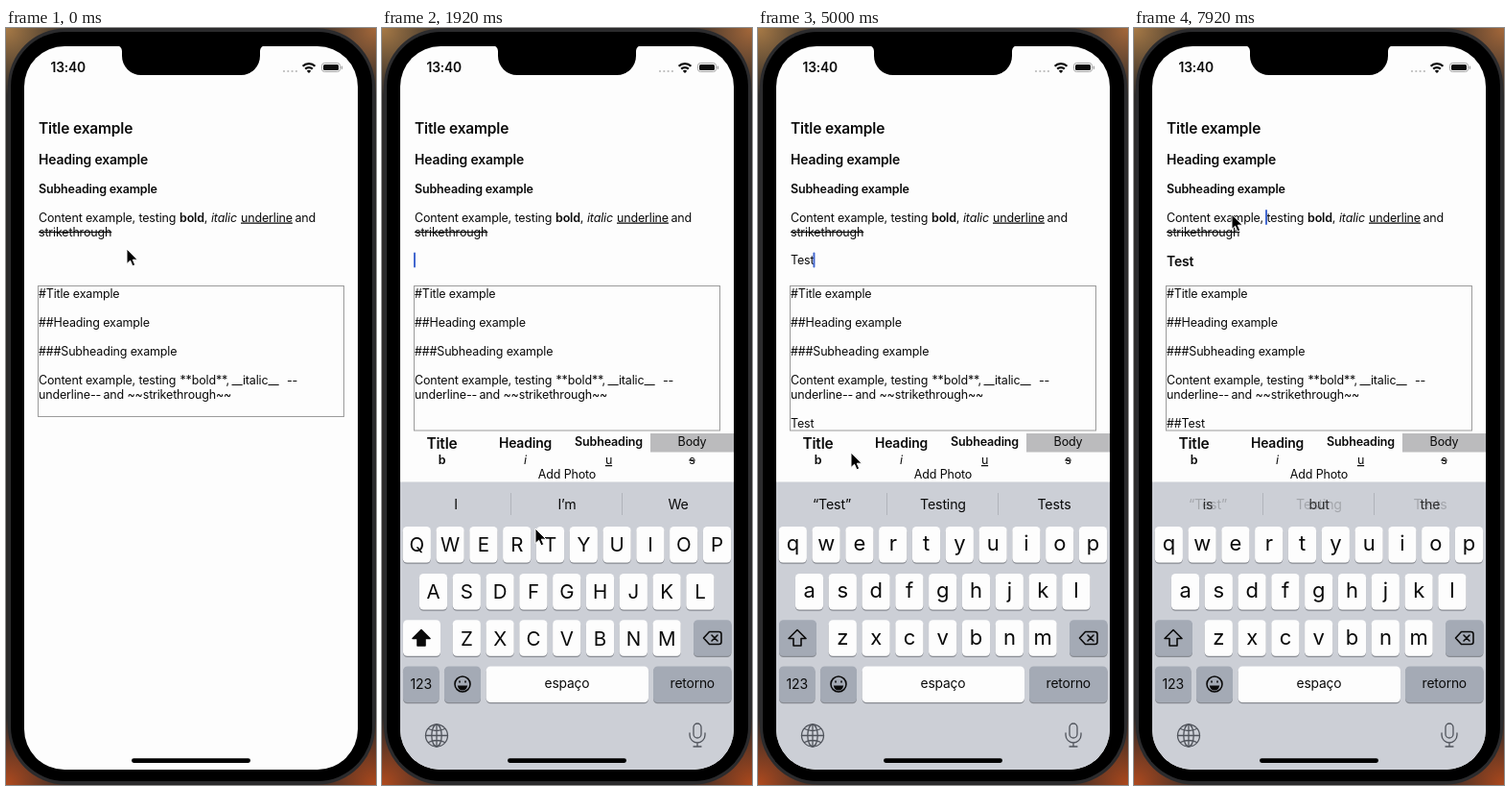
Write an HTML page that moves like this. It is 386 px wide and 788 px high and loops after 8000 ms.

```html
<!DOCTYPE html>
<html lang="en">
<head>
<meta charset="utf-8">
<title>Markdown editor</title>
<style>
  html, body { margin: 0; width: 100%; height: 100%; overflow: hidden; background: #000; }
  svg { display: block; width: 386px; height: 788px; font-family: Inter, sans-serif; letter-spacing: -0.01em; }
  text { fill: #0a0a0a; white-space: pre; }
  .line { fill: none; stroke: #0a0a0a; stroke-width: 1.6; stroke-linejoin: round; stroke-linecap: round; }
  .thin { fill: none; stroke: #50545c; stroke-width: 1.3; stroke-linecap: round; }
</style>
</head>
<body>
<svg id="stage" viewBox="0 0 386 788"></svg>
<script>
const PAPER = '#fdfdfd', BOARD = '#cccfd6', GREY = '#a4aab5', PICKED = '#bbbbbd', INK = '#0a0a0a';
const LOOP = 8000, LEFT = 34;
const STYLES = {
  Title: { size: 15.5, weight: 600, prefix: '#', base: 248 },
  Heading: { size: 13.9, weight: 600, prefix: '##', base: 247.5 },
  Subheading: { size: 12.5, weight: 600, prefix: '###', base: 246 },
  Body: { size: 12.5, weight: 400, prefix: '', base: 246 }
};

const text = (x, y, str, size = 12.5, attrs = '') =>
  `<text x="${x}" y="${y}" font-size="${size}" ${attrs}>${str}</text>`;
const mid = (x, y, str, size, attrs = '') => text(x, y, str, size, `text-anchor="middle" ${attrs}`);
const rect = (x, y, w, h, fill, r = 0, attrs = '') =>
  `<rect x="${x}" y="${y}" width="${w}" height="${h}" rx="${r}" fill="${fill}" ${attrs}/>`;
const key = (x, y, w, fill = PAPER, id = '') =>
  rect(x, y + 1.2, w, 37.5, '#888b92', 4.5) + rect(x, y, w, 37.5, fill, 4.5, id && `id="${id}"`);

const keyPos = {};
function letterKeys() {
  let out = '';
  [['qwertyuiop', 36.3, 519], ['asdfghjkl', 53.5, 568], ['zxcvbnm', 88.3, 616.3]].forEach(([row, x0, y]) => {
    [...row].forEach((ch, i) => {
      const x = x0 + i * 34.8;
      keyPos[ch] = [x, y];
      out += key(x - 14.6, y, 29.2) + mid(x, y + 26.5, ch, 21, `data-key="${ch}"`);
    });
  });
  return out;
}

function documentMarkup() {
  const bold = 'font-weight="600"';
  return text(LEFT, 109.5, 'Title example', STYLES.Title.size, bold)
    + text(LEFT, 142, 'Heading example', STYLES.Heading.size, bold)
    + text(LEFT, 172, 'Subheading example', STYLES.Subheading.size, bold)
    + text(LEFT, 201.5, 'Content example, testing')
    + text(181, 201.5, 'bold<tspan font-weight="400">,</tspan>', 12.5, bold)
    + text(214, 201.5, 'italic', 12.5, 'font-style="italic"')
    + text(245, 201.5, 'underline', 12.5, 'text-decoration="underline"')
    + text(301.5, 201.5, 'and')
    + text(LEFT, 216.5, 'strikethrough', 12.5, 'text-decoration="line-through"')
    + `<text id="typed" x="${LEFT}"></text>`
    + rect(33.5, 268.5, 319, 136, 'none', 0, 'id="box" stroke="#9b9b9b"')
    + text(LEFT, 281, '#Title example')
    + text(LEFT, 311, '##Heading example')
    + text(LEFT, 341, '###Subheading example')
    + text(LEFT, 371, 'Content example, testing')
    + text(181.5, 371, '**bold**,') + text(235.5, 371, '__italic__') + text(293, 371, '--')
    + text(LEFT, 385.5, 'underline--') + text(101.5, 385.5, 'and') + text(126.5, 385.5, '~~strikethrough~~')
    + `<text id="mirror" x="${LEFT}" y="415.5" font-size="12.5"></text>`
    + rect(33, 219, 2, 16, '#4267cf', 1, 'id="caret"');
}

function keyboardMarkup() {
  const columns = [62.5, 149.5, 236.5, 323.5];
  const tabs = Object.entries(STYLES).map(([name, s], i) =>
    mid(columns[i], [437.8, 436.8, 435, 434.5][i], name, s.size, `font-weight="${s.weight}"`)).join('');
  const marks = ['font-weight="600"', 'font-style="italic"', 'text-decoration="underline"', 'text-decoration="line-through"'];
  return `<g id="keyboard">`
    + rect(19, 422, 348, 51, PAPER) + rect(280, 422, 87, 19.5, PICKED, 0, 'id="tab"') + tabs
    + marks.map((m, i) => mid(columns[i], 454, 'bius'[i], 12.5, m)).join('')
    + mid(193, 469, 'Add Photo', 12.5)
    + rect(19, 472.5, 348, 370, BOARD)
    + rect(134, 484, 1, 23, '#b1b4bb') + rect(250, 484, 1, 23, '#b1b4bb')
    + ['old', 'new'].map(id => `<g id="${id}">` + [77, 193, 309].map(x => mid(x, 500.5, '', 14.2)).join('') + '</g>').join('')
    + letterKeys()
    + key(22, 616.3, 39, PAPER, 'shift') + key(325, 616.3, 39.5, GREY)
    + '<path id="arrow" class="line" d="M41 626.5l9 9h-5v7.5h-8v-7.5h-5z"/>'
    + '<path class="line" d="M335.5 635l6-6.5h10q2.5 0 2.5 2.5v8q0 2.5-2.5 2.5h-10zM344 632l6 6m0-6l-6 6"/>'
    + key(22, 664.5, 37.5, GREY) + mid(40.7, 688, '123', 14)
    + key(65, 664.5, 38, GREY)
    + `<circle class="line" cx="84" cy="683" r="8"/><path class="line" d="M81 680v1m6-1v1"/><path d="M78.8 684.5h10.4q-1 5-5.2 5t-5.2-5z" fill="${INK}"/>`
    + key(108.7, 664.5, 169.3) + mid(193, 686.5, 'espaço', 13.8)
    + key(283, 664.5, 81.5, GREY, 'enter') + mid(323.8, 686.5, 'retorno', 13.8)
    + '<g class="thin"><circle cx="57" cy="736.5" r="11.5"/><ellipse cx="57" cy="736.5" rx="5.2" ry="11.5"/>'
    + '<path d="M57 725v23M45.5 736.5h23M48.5 729.5q8.5 4 17 0M48.5 743.5q8.5-4 17 0"/>'
    + '<rect x="325" y="724" width="8" height="15" rx="4"/><path d="M321 734v2a8 8 0 0 0 16 0v-2M329 744v4m-4 0h8"/></g>'
    + '<g id="popup"><path d="M-20-9h40q6 0 6 6v40c0 10-11.4 12-11.4 22v22q0 5-5 5h-19.2q-5 0-5-5v-22c0-10-11.4-12-11.4-22v-40q0-6 6-6z" '
    + `fill="${PAPER}" stroke="#b2b5bc" stroke-width=".7"/>` + mid(0, 28.5, '', 33) + '</g></g>';
}

const corner = (id, x, y, color) =>
  `<radialGradient id="${id}" gradientUnits="userSpaceOnUse" cx="${x}" cy="${y}" r="70">`
  + `<stop stop-color="${color}"/><stop offset="1" stop-color="${color}" stop-opacity="0"/></radialGradient>`;
const corners = [['tl', 0, 0, '#a87a46'], ['tr', 386, 0, '#a5683a'], ['bl', 0, 788, '#b04a1e'], ['br', 386, 788, '#ac481c']];

document.getElementById('stage').innerHTML =
  `<defs>${corners.map(c => corner(...c)).join('')}<clipPath id="screen">${rect(19, 19, 348, 753, '#fff', 42)}</clipPath></defs>`
  + rect(0, 0, 386, 788, '#2c2a29')
  + corners.map(([id]) => rect(0, 0, 386, 788, `url(#${id})`)).join('')
  + rect(2, 0.5, 383, 787, '#2b2b2d', 60) + rect(5, 4, 377, 780, '#000', 57)
  + `<g clip-path="url(#screen)">${rect(19, 19, 348, 753, PAPER)}${documentMarkup()}${keyboardMarkup()}</g>`
  + '<path d="M115 18a6 6 0 0 1 6 6v5a20 20 0 0 0 20 20h104a20 20 0 0 0 20-20v-5a6 6 0 0 1 6-6z"/>'
  + text(46.5, 46, '13:40', 13.8, 'font-weight="600"')
  + [290, 294.3, 298.6, 302.9].map(x => `<circle cx="${x}" cy="45" r="1.1" fill="#bababa"/>`).join('')
  + `<path d="M309.6 39.8a9.1 9.1 0 0 1 12.8 0M312.2 42.6a5.4 5.4 0 0 1 7.6 0" fill="none" stroke="${INK}" stroke-width="2.3"/>`
  + '<path d="M316 47l-2.2-2.3q2.2-1.7 4.4 0z"/>'
  + rect(329.5, 36.5, 19, 9, 'none', 2.8, 'stroke="#a6a6a6"') + rect(331, 38, 16, 6, INK, 1.5) + rect(349.7, 39.5, 1.4, 3.5, '#a6a6a6', .7)
  + rect(131, 760.3, 124, 4.6, '#000', 2.3)
  + '<path id="pointer" d="M0 0v15.5l3.6-3.3 2.4 5.6 2.7-1.2-2.4-5.4h4.9z" fill="#000" stroke="#fff" stroke-width="1"/>';

const $ = id => document.getElementById(id);
const keyLabels = [...document.querySelectorAll('[data-key]')];

// Each entry overrides the state before it.
const states = [];
[
  { at: 0, typed: '', style: 'Body', upper: true, tall: false, words: ['I', 'I’m', 'We'] },
  { at: 480, caret: [LEFT, 219] },
  { at: 1450, tall: true, caret: 'end' },
  { at: 2150, typed: 'T', upper: false, words: ['“T”', 'The', 'This'] },
  { at: 2550, typed: 'Te', words: ['“Te”', 'Tell', 'Text'] },
  { at: 3060, typed: 'Tes', words: ['“Tes”', 'Test', 'Tests'] },
  { at: 3600, typed: 'Test', words: ['“Test”', 'Testing', 'Tests'] },
  { at: 5450, style: 'Title' },
  { at: 6200, style: 'Heading' },
  { at: 7770, caret: [138, 189], tab: 'Body', words: ['is', 'but', 'the'] }
].forEach((change, i) => states.push({ ...states[i - 1], ...change }));

const presses = [['t', 2060, 2150], ['e', 2460, 2550], ['s', 2950, 3060], ['t', 3500, 3600]];
const pointerPath = [
  [0, 126, 230], [350, 130, 237], [780, 130, 237], [1300, 322, 676], [1500, 322, 676], [1920, 160, 521],
  [2050, 172, 537], [2180, 172, 537], [2440, 106, 537], [2580, 106, 537], [2900, 99, 582], [3100, 99, 582],
  [3460, 175, 540], [3850, 175, 540], [4800, 97, 442], [5000, 97, 442], [5350, 66, 431], [5600, 66, 431],
  [6100, 129, 421], [6900, 129, 421], [7650, 102, 194], [8000, 102, 194]
];

function pointerAt(t) {
  const i = pointerPath.findIndex(p => p[0] > t);
  const [t0, x0, y0] = pointerPath[i - 1], [t1, x1, y1] = pointerPath[i];
  const u = (t - t0) / (t1 - t0), e = u * u * (3 - 2 * u);
  return [x0 + (x1 - x0) * e, y0 + (y1 - y0) * e];
}

function keyboardOffset(t) {
  const s = Math.max(0, t - 450) * 0.0165;
  return 370 * (1 + s) * Math.exp(-s);
}

const set = (el, attrs) => Object.entries(attrs).forEach(([k, v]) => el.setAttribute(k, v));
const write = (el, str) => { if (el.textContent !== str) el.textContent = str; };
const show = (el, on) => set(el, { visibility: on ? 'visible' : 'hidden' });

function render(t) {
  const i = states.findLastIndex(s => s.at <= t);
  const state = states[i], before = states[Math.max(0, i - 1)];
  const style = STYLES[state.style];
  const typed = $('typed');

  write(typed, state.typed);
  set(typed, { y: style.base, 'font-size': style.size, 'font-weight': style.weight });
  write($('mirror'), state.typed && style.prefix + state.typed);
  set($('box'), { height: state.tall ? 150.5 : 136 });

  show($('caret'), state.caret && (t - state.at) % 1000 < 500);
  if (state.caret) {
    const [x, y] = state.caret === 'end'
      ? [LEFT + (state.typed ? typed.getComputedTextLength() : 0), 233.5] : state.caret;
    set($('caret'), { x: x - 1, y });
  }

  set($('keyboard'), { transform: `translate(0 ${keyboardOffset(t).toFixed(2)})` });
  set($('tab'), { x: 19 + 87 * Object.keys(STYLES).indexOf(state.tab || state.style) });

  const fade = state.words === before.words ? 1 : Math.min(1, (t - state.at) / 190);
  [['old', before, 1 - fade], ['new', state, fade]].forEach(([id, s, opacity]) => {
    set($(id), { opacity });
    [...$(id).children].forEach((el, n) => write(el, s.words[n]));
  });

  keyLabels.forEach(el => {
    const ch = el.dataset.key;
    write(el, state.upper ? ch.toUpperCase() : ch);
    set(el, { 'font-size': state.upper ? 20.5 : 22, y: keyPos[ch][1] + (state.upper ? 26.3 : 25.3) });
  });
  set($('shift'), { fill: state.upper ? PAPER : GREY });
  set($('arrow'), { style: `fill:${state.upper ? INK : 'none'}` });
  set($('enter'), { fill: t >= 1360 && t < 1450 ? PAPER : GREY });

  const press = presses.find(([, from, to]) => t >= from && t < to);
  show($('popup'), press);
  if (press) {
    const [x, y] = keyPos[press[0]];
    set($('popup'), { transform: `translate(${x} ${y - 49})` });
    write($('popup').lastChild, state.upper ? press[0].toUpperCase() : press[0]);
  }

  set($('pointer'), { transform: `translate(${pointerAt(t).map(v => v.toFixed(2)).join(' ')})` });
}

const start = performance.now();
function tick() {
  render((performance.now() - start) % LOOP);
  requestAnimationFrame(tick);
}
tick();
</script>
</body>
</html>
```
